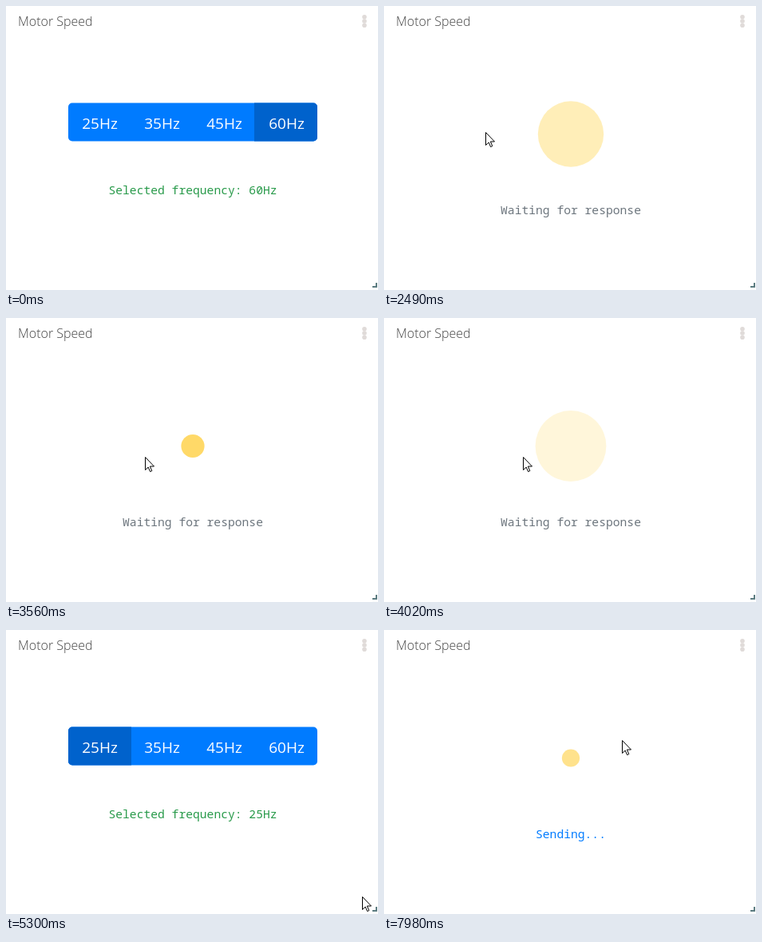
Recreate the animation shown at these times as an HTML page. Size 466 px wide and 356 px high, loop 8 s.

```html
<!DOCTYPE html>
<html lang="en">
<head>
<meta charset="utf-8">
<title>Motor Speed</title>
<style>
  html, body { margin: 0; width: 100%; height: 100%; overflow: hidden; background: #fff; }
  svg { display: block; width: 466px; height: 356px; }
  .title { font: 300 16px "Open Sans", sans-serif; fill: #444; }
  .label { font: 19px "Open Sans", "Noto Sans", sans-serif; fill: #fff; text-anchor: middle; }
  .mono { font: 14.66px "Noto Sans Mono", "DejaVu Sans Mono", monospace; text-anchor: middle; }
</style>
</head>
<body>
<svg viewBox="0 0 466 356">
  <clipPath id="pill"><rect x="78" y="121.5" width="312" height="48" rx="5"/></clipPath>
  <text class="title" x="15" y="25">Motor Speed</text>
  <g fill="#e0dbd9">
    <circle cx="449" cy="13.8" r="2.8"/>
    <circle cx="449" cy="19" r="2.8"/>
    <circle cx="449" cy="24.2" r="2.8"/>
  </g>
  <path d="M459 352H464V347" fill="none" stroke="#5b7b80" stroke-width="2"/>
  <g id="panel">
    <g id="buttons" clip-path="url(#pill)">
      <rect x="78" y="121" width="312" height="49" fill="#007bff"/>
    </g>
    <text id="chosen" class="mono" x="234" y="236" fill="#289a4a"></text>
  </g>
  <g id="busy">
    <circle id="spinner" cx="234" cy="160.5" fill="#ffc107"/>
    <text id="status" class="mono" x="234" y="261"></text>
  </g>
  <path id="cursor" d="M.5 .5V16.5L4.2 13L6.6 18.6L8.8 17.6L6.4 12H11.5Z" fill="#fff" stroke="#000"/>
</svg>
<script>
const LOOP = 8000;
const SENT = 1880, DONE = 5200, RESENT = 7700;
const speeds = ["25Hz", "35Hz", "45Hz", "60Hz"];
const $ = id => document.getElementById(id);
const clamp = v => Math.min(1, Math.max(0, v));

// Pointer stops: time, x, y
const stops = [
  [0, 354, 370], [899, 354, 370], [900, 354, 346], [1330, 95, 147],
  [2250, 95, 147], [2800, 174, 173], [3100, 174, 173], [3200, 174, 174],
  [4770, 174, 174], [5170, 446, 334], [6200, 446, 334], [6960, 298, 138],
  [LOOP, 298, 138]
];

function add(tag, attrs, text = "") {
  const el = document.createElementNS("http://www.w3.org/2000/svg", tag);
  for (const key in attrs) el.setAttribute(key, attrs[key]);
  el.textContent = text;
  return $("buttons").appendChild(el);
}

const shades = speeds.map((_, i) =>
  add("rect", { x: 77 + 78 * i, y: 121, width: 80, height: 49, fill: "#0062cc" }));
speeds.forEach((name, i) => add("text", { class: "label", x: 117.5 + 78 * i, y: 154 }, name));

function pointer(t) {
  const i = Math.max(1, stops.findIndex(s => s[0] >= t));
  const [t0, x0, y0] = stops[i - 1], [t1, x1, y1] = stops[i];
  const p = clamp((t - t0) / (t1 - t0)), e = p * p * (3 - 2 * p);
  return [x0 + (x1 - x0) * e, y0 + (y1 - y0) * e];
}

function hovered(t) {
  const [x, y] = pointer(Math.max(0, t));
  return x > 78 && x < 390 && y > 121 && y < 170 ? Math.floor((x - 78) / 78) : -1;
}

// A 150 ms linear fade equals the mean of the last 150 ms
function hover(i, t) {
  let sum = 0;
  for (let k = 0; k < 10; k++) sum += hovered(t - 15 * k) === i;
  return 0.72 * sum / 10;
}

function draw(t) {
  const busy = t >= SENT && t < DONE || t >= RESENT;
  $("panel").style.display = busy ? "none" : "";
  $("busy").style.display = busy ? "" : "none";

  if (busy) {
    const p = t < DONE ? (t - 1856) / 740 % 1 : clamp((t - 7740) / 1040);
    $("spinner").setAttribute("r", 48 * p);
    $("spinner").setAttribute("opacity", 1 - Math.abs(2 * p - 1));
    const waiting = t > 2380 && t < DONE;
    $("status").textContent = waiting ? "Waiting for response" : "Sending...";
    $("status").setAttribute("fill", waiting ? "#6c757d" : "#007bff");
  } else {
    const active = t < SENT ? 3 : 0;
    const fade = t < SENT ? 1 : clamp((t - DONE) / 100);
    shades.forEach((el, i) =>
      el.setAttribute("opacity", i === active ? fade : hover(i, t)));
    $("chosen").textContent = "Selected frequency: " + speeds[active];
  }

  const [x, y] = pointer(t).map(Math.round);
  $("cursor").setAttribute("transform", `translate(${x} ${y})`);
}

const start = performance.now();
function tick() {
  draw((performance.now() - start) % LOOP);
  requestAnimationFrame(tick);
}
tick();
</script>
</body>
</html>
```
